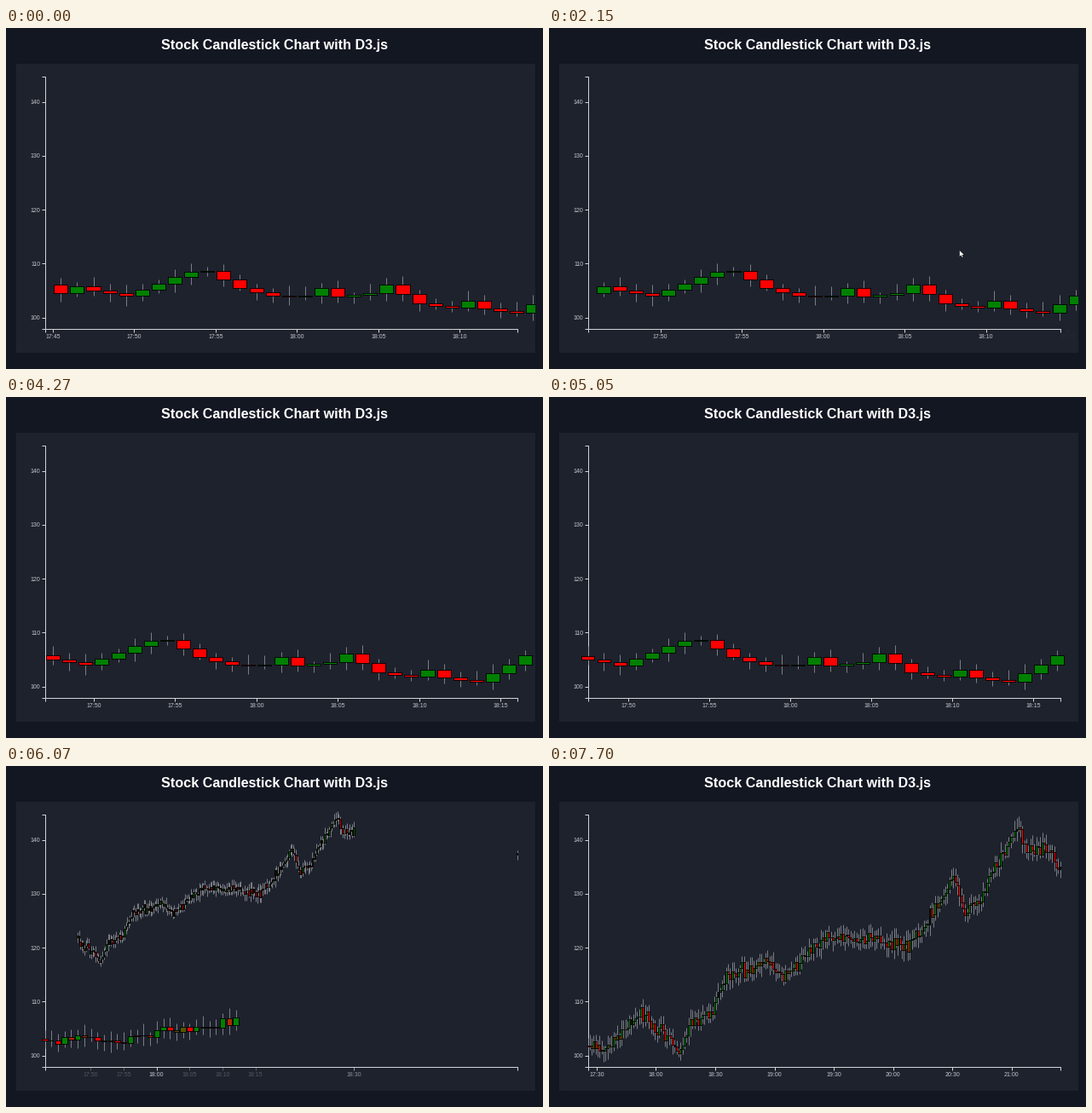
Write a matplotlib script that moves like this. It is 630x400 px and loops after 7720 ms.

```python
import matplotlib.pyplot as plt
import numpy as np
from matplotlib.animation import FuncAnimation
from matplotlib.collections import LineCollection, PolyCollection
from matplotlib.patches import Polygon, Rectangle

W, H, DPI = 630, 400, 100
LOOP, STEP = 7720, 40
PX = 72 / DPI                      # points per pixel
LEFT, RIGHT, TOP, BASE = 46, 600, 57, 353
SPAN = RIGHT - LEFT
BOX = (12, 42, 609, 339)           # chart panel: x, y, width, height
AXIS, LABEL = "#d2d3d6", "#c2c4c9"
RED, GREEN = (1, 0, 0), (0, 0.5, 0)
FIRST = 17 * 60 + 45.5             # clock minute of the first live candle
SLOTS, DAY = 30, 240

# A view is (first minute, pixels per minute, tick step).
GAP = SPAN / (SLOTS - 1)
DAY_GAP = SPAN / (DAY - 1)
live_views = [(FIRST - 1 + k, GAP, 5) for k in range(4)]
day_view = (FIRST - 20, DAY_GAP, 30)

# Transitions: (start, duration).
SHIFTS = [(0, 1330), (2075, 1330), (3600, 1330)]
ZOOM = (5050, 1490)

# Turning points of the price curves: (candle index, height in pixels).
LIVE_TURNS = [(0, 301.5), (1, 311.5), (2, 303.5), (3, 308), (5, 315), (9, 286),
              (10, 285), (12, 305), (14, 315), (16, 315), (17, 305.5), (18, 316),
              (20, 312), (21, 302), (23, 323.5), (25, 329.5), (26, 320.5),
              (27, 330), (29, 335), (32, 304)]
DAY_TURNS = [(0, 335), (11, 328), (28, 291), (48, 336), (54, 296), (63, 290),
             (71, 244), (92, 231), (100, 249), (121, 200), (153, 207),
             (163, 209), (175, 178), (186, 130), (192, 168), (199, 158),
             (217, 75), (224, 99), (233, 97), (239, 118)]


def lerp(a, b, p):
    return a + (b - a) * p


def progress(t, start, length):
    return min(max((t - start) / length, 0), 1)


def view_x(view, minute):
    return LEFT + (minute - view[0]) * view[1]


def has_tick(view, minute):
    return float(minute % view[2] == 0 and LEFT <= view_x(view, minute) <= RIGHT)


def make_candles(turns, jitter, wick, seed):
    """Rows of open, close, high, low; each candle opens at the last close."""
    rng = np.random.default_rng(seed)
    index, height = np.array(turns).T
    path = np.interp(np.arange(index[-1] + 1), index, height)
    path += rng.normal(0, jitter, len(path))
    opens, close = path[:-1], path[1:]
    high = np.minimum(opens, close) - rng.uniform(*wick, len(close))
    low = np.maximum(opens, close) + rng.uniform(*wick, len(close))
    return np.column_stack([opens, close, high, low])


def tints(rows):
    return np.where((rows[:, 1] < rows[:, 0])[:, None], GREEN, RED)


live = make_candles(LIVE_TURNS, 0.3, (3, 12), 4)
day = make_candles(DAY_TURNS + [(DAY, 117)], 4, (3, 13), 8)

# Where each candle starts its zoom: a live slot, or the panel's corner.
x_from = np.full(DAY, BOX[0], float)
y_from = np.full((DAY, 4), BOX[1], float)
w_from = np.zeros(DAY)
tint_from = np.zeros((DAY, 3))
x_from[:SLOTS] = LEFT + GAP * np.arange(SLOTS)
y_from[:SLOTS] = live[2:]
w_from[:SLOTS] = 0.84 * GAP
tint_from[:SLOTS] = tints(live[2:])
x_from[-1], y_from[-1] = RIGHT + 1, 75      # the newest one starts in place
x_to = LEFT + DAY_GAP * np.arange(DAY)

fig = plt.figure(figsize=(W / DPI, H / DPI), dpi=DPI, facecolor="#131722")
ax = fig.add_axes([0, 0, 1, 1])
ax.set_xlim(0.5, W + 0.5)
ax.set_ylim(H + 0.5, 0.5)
ax.axis("off")
panel = Rectangle(BOX[:2], BOX[2], BOX[3], fc="#1e222d", ec="none")
ax.add_patch(panel)


def label(x, y, text, size=7, color=LABEL, **style):
    return ax.text(x, y, text, size=size * PX, color=color, va="baseline",
                   family="Liberation Sans", **style)


def line(xs, ys):
    return ax.plot(xs, ys, color=AXIS, lw=PX, solid_capstyle="butt", zorder=2)[0]


label(316, 26, "Stock Candlestick Chart with D3.js", 16.15, "white",
      weight="bold", ha="center")

line([LEFT - 4, LEFT, LEFT, LEFT - 4], [TOP, TOP, BASE, BASE])
line([LEFT, LEFT, RIGHT, RIGHT], [BASE + 4, BASE, BASE, BASE + 4])
for price in range(100, 141, 10):
    y = 340 - (price - 100) * 6.325
    line([LEFT - 4, LEFT], [y, y])
    label(LEFT - 5, y + 2.6, price, ha="right")

ticks = {}
for minute in range(17 * 60 + 30, 21 * 60 + 1, 5):
    if minute % 30 and minute > 18 * 60 + 15:
        continue
    mark = line([0, 0], [BASE, BASE + 4])
    text = label(0, 365, f"{minute // 60}:{minute % 60:02d}", ha="center")
    for part in (mark, text):
        part.set_clip_path(panel)
    ticks[minute] = mark, text

wicks = LineCollection([], colors="#8b8d93", linewidths=0.85 * PX, zorder=3)
bodies = PolyCollection([], edgecolors="black", linewidths=0.85 * PX, zorder=4)
for group in (wicks, bodies):
    ax.add_collection(group, autolim=False)
    group.set_clip_path(panel)

arrow = np.array([(0, 0), (0, 8), (1.9, 6.3), (3.2, 9), (4.5, 8.4),
                  (3.3, 5.8), (5.8, 5.6)])
cursor = ax.add_patch(Polygon(arrow + (482, 261), fc="white", ec="black",
                              lw=0.5 * PX, zorder=6))


def draw_ticks(a, b, p):
    for minute, (mark, text) in ticks.items():
        x = lerp(view_x(a, minute), view_x(b, minute), p)
        alpha = lerp(has_tick(a, minute), has_tick(b, minute), p)
        mark.set_xdata([x, x])
        text.set_x(x)
        for part in (mark, text):
            part.set_alpha(alpha)
            part.set_visible(alpha > 0.01 and abs(x) < 2 * W)


def draw_candles(x, rows, width, colors):
    opens, close, high, low = rows.T
    l, r = x - width / 2, x + width / 2
    wicks.set_segments(np.stack([np.c_[x, high], np.c_[x, low]], 1))
    bodies.set_verts(np.stack([np.c_[l, opens], np.c_[r, opens],
                               np.c_[r, close], np.c_[l, close]], 1))
    bodies.set_facecolor(colors)


def draw_live(t):
    k = sum(t >= start for start, _ in SHIFTS) - 1
    a, b = live_views[k], live_views[k + 1]
    p = progress(t, *SHIFTS[k])
    draw_ticks(a, b, p)
    minutes = FIRST + k + np.arange(SLOTS)
    rows = live[k:k + SLOTS]
    x = lerp(view_x(a, minutes), view_x(b, minutes), p)
    draw_candles(x, rows, 0.84 * GAP, tints(rows))


def draw_zoom(t):
    p = progress(t, *ZOOM)
    draw_ticks(live_views[3], day_view, p)
    index = np.arange(DAY)
    old = index < SLOTS
    # Entering candles lead a little sideways and lag a little in height.
    x = lerp(x_from, x_to, np.where(old, p, p ** 0.92))
    rows = lerp(y_from, day, np.where(old, p, p ** 1.16)[:, None])
    width = lerp(w_from, 0.85 * DAY_GAP, p)
    colors = lerp(tint_from, tints(day), p)
    shown = (index < DAY - 9) | (t >= 6200)     # the newest ones join late
    shown[-1] = t >= 5990
    draw_candles(x[shown], rows[shown], width[shown], colors[shown])


def update(frame):
    t = (frame + 0.5) * STEP
    if t < ZOOM[0]:
        draw_live(t)
    else:
        draw_zoom(t)
    cursor.set_visible(1990 <= t < 2500)
    return []


anim = FuncAnimation(fig, update, frames=LOOP // STEP, interval=STEP,
                     repeat=True, repeat_delay=0, blit=False)
plt.show()
```
